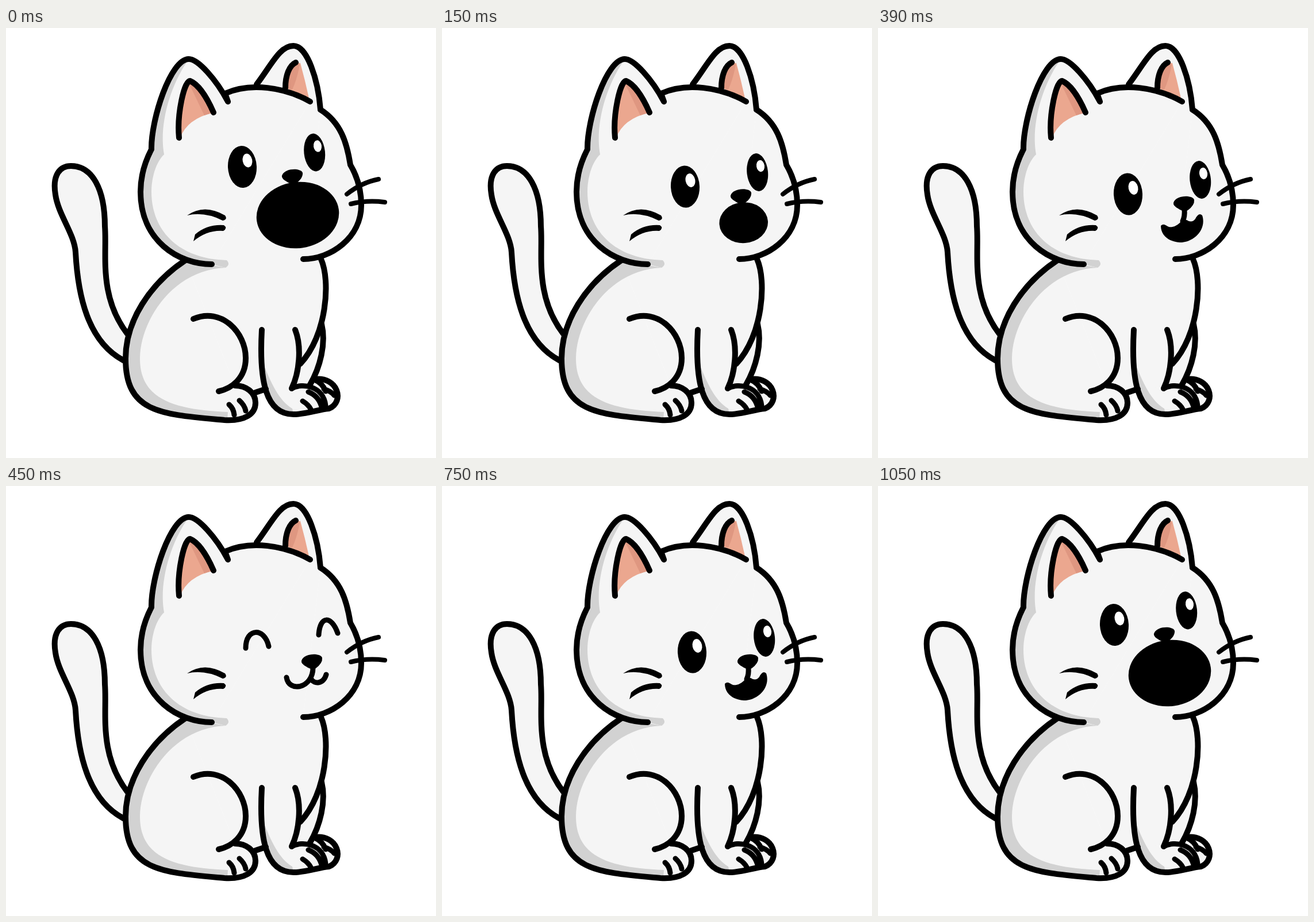
An HTML page that plays this animation: 748x748 px, repeating every 1.2 s.

```html
<!DOCTYPE html>
<html lang="en">
<head>
<meta charset="utf-8">
<title>Sitting cat</title>
<style>
  html, body { margin: 0; width: 100%; height: 100%; overflow: hidden; background: #fff; }
  svg { display: block; }
  .fur { fill: #f5f5f5; }
  .shade { fill: #d2d2d2; }
  .pink { fill: #eba78f; }
  .rose { fill: #df9781; }
  .shine { fill: #fff; }
  .line { fill: none; stroke: #000; stroke-width: 10; stroke-linecap: round; stroke-linejoin: round; }
  .thin { stroke-width: 9; }
</style>
</head>
<body>
<svg width="748" height="748" viewBox="0 0 748 748">
  <defs>
    <g id="outline">
      <path d="M211,532 C160,465 176,392 172,345 C172,280 150,240 113,240 C95,240 80,254 86,290 C91,325 119,358 121,390 C125,465 142,545 204,578"/>
      <path d="M312,404 C250,445 208,510 208,575 C208,670 270,672 380,682 C415,684 434,672 434,652 C434,634 418,622 398,622"/>
      <path d="M445,525 C440,615 452,672 500,672 C525,672 540,664 562,662 C590,650 577,606 537,611"/>
      <path d="M528,622 C547,590 557,548 549,515"/>
      <path d="M436,98 C462,64 476,31 500,31 S543,90 547,142"/>
      <path d="M358,411 C300,411 234,370 234,285 C234,258 241,234 253,211 C252,160 286,54 318,54 C334,54 366,90 386,128 L381,114 C425,94 485,103 529,128"/>
      <path d="M547,142 C583,165 593,200 599,238 C612,260 618,285 618,308 C618,365 565,402 517,402"/>
    </g>
    <g id="eyes">
      <ellipse rx="25" ry="36.5" transform="translate(435 289) rotate(-3)"/>
      <ellipse rx="8.3" ry="12" transform="translate(444 278) rotate(-12)" class="shine"/>
      <ellipse rx="18.3" ry="33" transform="translate(560.7 264) rotate(-6)"/>
      <ellipse rx="7" ry="10.2" transform="translate(566 253) rotate(-8)" class="shine"/>
    </g>
    <path id="nose" d="M514,304 C518,290 548,290 550,299 Q551,308 539,317 Q532,321 522,314 Q513,309 514,304"/>
  </defs>

  <use href="#outline" class="fur"/>
  <path class="fur" d="M312,404 L358,411 529,128 547,142 517,402 548,402 C565,440 562,470 549,515 L528,622 452,628 434,652 398,622"/>

  <path class="shade" d="M318,54 C286,54 252,160 253,211 C241,234 234,258 234,285 C234,370 300,411 358,411 L382,417 Q391,411 384,404 C300,402 253,352 253,285 C253,258 262,232 275,220 C266,170 284,105 314,60"/>
  <path class="shade" d="M385,682 C270,672 208,670 208,575 C208,510 250,445 312,404 L382,417 C290,420 233,510 233,575 C233,650 300,664 386,668"/>
  <path class="shade" d="M446,580 C450,650 470,672 500,670 L498,662 C475,648 462,620 446,580"/>

  <path class="pink" d="M301,191 C297,150 310,92 320,92 C335,98 350,122 361,147 Q315,158 303,191"/>
  <path class="rose" d="M320,100 L345,152 361,147 C350,122 335,98 320,92"/>
  <path class="pink" d="M486,104 C486,82 493,65 504,60 L512,61 Q520,90 527,122"/>
  <path class="rose" d="M486,104 C486,82 493,65 504,60 L511,64 Q506,90 498,107"/>

  <g class="line">
    <use href="#outline"/>
    <path d="M548,402 C565,440 558,535 512,584"/>
    <path d="M301,191 C297,150 310,92 320,92 C335,98 350,122 361,147 M486,104 C486,82 493,65 504,60"/>
    <path d="M326,506 C375,485 417,530 417,574 C417,610 392,627 370,632 M434,634 L452,628"/>
    <path d="M503,525 C515,555 510,600 497,627"/>
    <g class="thin">
      <path d="M388,655 Q396,662 397,673 M406,648 Q415,656 417,666"/>
      <path d="M497,627 C515,617 552,622 556,657 M516,649 Q526,655 530,663 M526,633 Q544,640 549,659"/>
      <path d="M537,612 Q551,618 556,632 M553,628 Q566,632 571,639"/>
    </g>
    <path stroke-width="8" d="M593,289 Q618,269 648,263 M600,306 Q628,299 659,303"/>
  </g>
  <path d="M315,326 Q345,305 381,326 Q386,333 377,335 Q345,319 315,326"/>
  <path d="M326,371 L329,359 Q350,341 379,343 Q386,348 378,353 Q350,351 326,371"/>

  <g class="pose">
    <use href="#eyes" x="-24" y="-47.5"/>
    <use href="#nose" x="-34" y="-47"/>
    <ellipse rx="72" ry="57.5" transform="translate(507.5 325.5) rotate(-8)"/>
  </g>
  <g class="pose">
    <use href="#eyes" x="-12" y="-13"/>
    <use href="#nose" x="-12" y="-12.5"/>
    <ellipse rx="42.3" ry="35.5" transform="translate(524.7 338.7) rotate(-4)"/>
  </g>
  <g class="pose">
    <use href="#eyes"/>
    <use href="#nose"/>
    <path class="line thin" d="M533,316 Q534,328 530,336"/>
    <path d="M492,344 C499,337 502,348 512,346 Q522,344 529,334 H537 Q546,340 552,332 Q558,320 564,326 C572,350 550,373 525,373 C505,372 492,360 492,344"/>
  </g>
  <g class="pose">
    <use href="#nose"/>
    <path class="line thin" d="M417,282 C417,246 450,246 457,279 M544,259 C546,225 566,225 577,256"/>
    <path class="line thin" d="M488,333 C492,360 534,352 534,316 M531,336 C536,345 552,345 557,328"/>
  </g>
</svg>
<script>
const STEP = 150;
const poses = document.querySelectorAll('.pose');

// Eight steps per loop: through the poses and back again.
function frame() {
  const step = Math.floor(performance.now() / STEP) % 8;
  const current = Math.min(step, 7 - step);
  poses.forEach((pose, i) => pose.style.display = i === current ? '' : 'none');
  requestAnimationFrame(frame);
}
frame();
</script>
</body>
</html>
```
